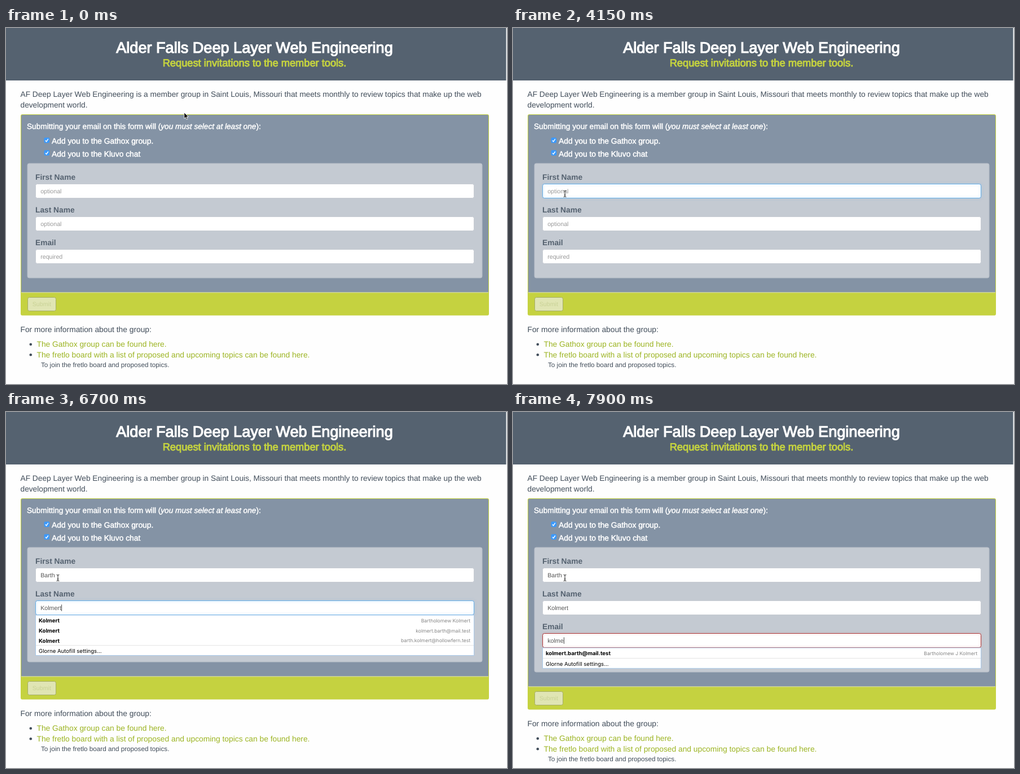
Recreate the animation shown at these times as an HTML page. Size 888 by 631 pixels, loop 8000 ms.

```html
<!DOCTYPE html>
<html lang="en">
<head>
<meta charset="utf-8">
<title>Invitation form</title>
<style>
  html, body { margin: 0; width: 100%; height: 100%; overflow: hidden; background: #fefefe; }
  svg { display: block; width: 888px; height: 631px; }
  text {
    font: 13.8px "Liberation Sans", Arial, sans-serif;
    fill: #414d5a; text-rendering: geometricPrecision; white-space: pre;
  }
  .mid { stroke: currentColor; stroke-width: .036em; }
  .white { fill: #fff; color: #fff; }
  .lime { fill: #c5d33f; color: #c5d33f; }
  .title { font-size: 27.1px; text-anchor: middle; stroke-width: .044em; }
  .sub { font-size: 18.25px; text-anchor: middle; stroke-width: .05em; }
  .intro { font-size: 13.72px; }
  .ask { font-size: 13.65px; }
  .label { font-weight: bold; font-size: 13.75px; fill: #556270; }
  .link { fill: #9cb422; }
  .note { font-size: 11.7px; }
  .value { font-size: 10.65px; fill: #555; }
  .hint { font-size: 10.65px; fill: #999; }
  .submit { font-size: 10.65px; fill: #c9d296; text-anchor: middle; }
  .pop text { font: 9.6px Inter, "Open Sans", sans-serif; fill: #000; }
  .pop .pick { font-weight: bold; font-size: 9.6px; }
  .pop .who { font-size: 8.6px; fill: #858585; text-anchor: end; }
  .ring { fill: none; stroke: #66afe9; filter: drop-shadow(0 0 2.5px rgba(102,175,233,.65)); }
  .ring.bad { stroke: #b03a3c; filter: drop-shadow(0 0 2px rgba(206,132,131,.7)); }
  .box { fill: #3b99fc; }
  .box.off { fill: #fff; stroke: #bbb; stroke-width: .6; }
  .tick { fill: none; stroke: #fff; stroke-width: 1.4; }
</style>
</head>
<body>
<svg viewBox="0 0 888 631">
  <rect width="886.5" height="93" fill="#556270"/>
  <text class="mid white title" x="440.5" y="44">Alder Falls Deep Layer Web Engineering</text>
  <text class="mid lime sub" x="440.5" y="68.3">Request invitations to the member tools.</text>
  <text class="intro" x="25.5" y="122">AF Deep Layer Web Engineering is a member group in Saint Louis, Missouri that meets monthly to review topics that make up the web</text>
  <text class="intro" x="25.5" y="141">development world.</text>

  <rect id="panel" x="26" y="153" width="830" height="356.5" rx="3" fill="#c5d240"/>
  <rect id="body" x="27" y="154" width="828" height="314.5" rx="2" fill="#8493a5"/>
  <text class="mid white ask" x="37" y="179">Submitting your email on this form will (<tspan font-style="italic">you must select at least one</tspan>):</text>
  <g id="checks"></g>
  <text class="mid white" x="81" y="205.3">Add you to the Gathox group.</text>
  <text class="mid white" x="81" y="228">Add you to the Kluvo chat</text>
  <rect id="well" x="38" y="240" width="806" height="203" rx="3" fill="#c4cad2" stroke="#b4bbc5"/>

  <g id="below">
    <rect x="27" y="468" width="828" height="3" fill="#c5d240"/>
    <rect x="27" y="465" width="828" height="3.5" fill="#8493a5"/>
    <rect x="27" y="468.4" width="828" height=".9" fill="#dde0cb"/>
    <rect x="38.5" y="477.5" width="50" height="24" rx="3" fill="#e0e5b4" stroke="#a5ad66"/>
    <text class="submit" x="63.3" y="493">Submit</text>
    <text x="25.5" y="538.7">For more information about the group:</text>
    <g fill="#414d5a"><circle cx="43.8" cy="560.7" r="2.3"/><circle cx="43.8" cy="579.3" r="2.3"/></g>
    <text class="link" x="54.5" y="565">The Gathox group can be found here.</text>
    <text class="link" x="54.5" y="583.7">The fretlo board with a list of proposed and upcoming topics can be found here.</text>
    <text class="note" x="62" y="600.5">To join the fretlo board and proposed topics.</text>
  </g>

  <g id="fields"></g>
  <g id="pops"></g>

  <g id="cursor" stroke-linejoin="round">
    <path id="arrow" d="M0 0V10.8L2.5 8.5 4.2 12.4 6 11.6 4.3 7.8H7.7Z" stroke="#fff" stroke-width=".9"/>
    <path id="hand" d="M3.2.8q1.2-.6 1.5.8l.8 3c.6-.5 1.4-.4 1.7.2.7-.5 1.4-.2 1.7.4 1-.3 1.6.5 1.5 1.6l-.2 2.6-1 2.2v1.5h-5.2l-.3-1.5-2.7-3.6c-.5-.8.6-1.5 1.3-.9l1.2 1-1-5.8q-.2-1 .7-1.5z" fill="#fff" stroke="#000" stroke-width=".9"/>
    <g id="beam" fill="none">
      <path d="M-2.3-5.6Q0-5.6 0-4V4Q0 5.6-2.3 5.6M2.3-5.6Q0-5.6 0-4M0 4Q0 5.6 2.3 5.6M-1.3 2H1.3" stroke="#fff" stroke-width="2" opacity=".6"/>
      <path d="M-2.3-5.6Q0-5.6 0-4V4Q0 5.6-2.3 5.6M2.3-5.6Q0-5.6 0-4M0 4Q0 5.6 2.3 5.6M-1.3 2H1.3" stroke="#222"/>
    </g>
  </g>
</svg>
<script>
const LOOP = 8000, STEP = 150, GROW = 18, ERROR_AT = 7300;
const $ = id => document.getElementById(id);
const show = (el, on) => { el.style.display = on ? '' : 'none'; };
const latest = (list, t) => list.filter(row => row[0] <= t).pop();

const full = 'Bartholomew Kolmert';
const mail = 'kolmert.barth@mail.test';
const workMail = 'barth.kolmert@hollowfern.test';

// keys: [time, letters typed]
const fields = [
  { label: 'First Name', hint: 'optional', word: 'Barth', y: 289, from: 3700, to: 5350,
    keys: [[0, 0], [4450, 1], [4750, 2], [4900, 4], [5050, 5]],
    picks: [['Barth', full], ['Barth', mail]] },
  { label: 'Last Name', hint: 'optional', word: 'Kolmert', y: 347, from: 5350, to: 7000,
    keys: [[0, 0], [5800, 1], [5950, 2], [6100, 4], [6250, 5], [6400, 6], [6700, 7]],
    picks: [['Kolmert', full], ['Kolmert', mail], ['Kolmert', workMail]] },
  { label: 'Email', hint: 'required', word: 'kolme', y: 405, from: 7000, to: 8000,
    keys: [[0, 0], [7300, 1], [7450, 2], [7600, 3], [7750, 4], [7900, 5]],
    picks: [[mail, 'Bartholomew J Kolmert']] }
];

const checks = [
  { y: 199, off: 1170, on: 1470 },
  { y: 221.3, off: 2060, on: 2960 }
];

const moves = [
  [0, 'arrow', 315.8, 149.8], [150, 'arrow', 306, 157], [300, 'arrow', 264, 184],
  [450, 'hand', 202, 210], [600, 'hand', 140, 223], [740, 'hand', 104, 220],
  [880, 'hand', 84, 210], [1030, 'hand', 76, 201], [1170, 'hand', 75, 199],
  [1320, 'hand', 77, 200], [1470, 'hand', 76, 199], [1620, 'hand', 84, 206],
  [1770, 'hand', 87, 213], [1910, 'hand', 81, 219], [2060, 'hand', 76, 221.5],
  [3260, 'arrow', 85, 258], [3410, 'beam', 92, 294]
];

$('checks').innerHTML = checks.map(({ y }) => `
  <rect class="box" x="67.5" y="${y - 4.8}" width="9.6" height="9.6" rx="2"/>
  <path class="tick" d="M69.8 ${y + .3}l1.8 2 3.2-4.6"/>`).join('');

$('fields').innerHTML = fields.map(({ label, hint, y }) => `<g>
  <text class="label" x="52" y="${y - 20.2}">${label}</text>
  <rect x="52.5" y="${y - 12.5}" width="777" height="25" rx="3" fill="#fff" stroke="#c6cbd2"/>
  <rect class="ring" x="52.5" y="${y - 12.5}" width="777" height="25" rx="3"/>
  <text class="hint" x="61.2" y="${y + 3.8}">${hint}</text>
  <text class="value" x="61.2" y="${y + 3.8}"></text>
  <rect class="caret" y="${y - 5.7}" width=".9" height="11.6" fill="#333"/></g>`).join('');

function popup({ y, picks }) {
  const top = y + 13, last = top + 10 + 17.6 * (picks.length - 1);
  const rows = picks.map(([pick, who], i) => {
    const base = top + 13.4 + 17.6 * i;
    return `<text class="pick" x="58" y="${base}">${pick}</text>
      <text class="who" x="823" y="${base - .4}">${who}</text>`;
  }).join('');
  return `<g class="pop">
    <rect x="52.5" y="${top}" width="777" height="${last + 26.3 - top}" fill="#fff" stroke="#a3c6ea" stroke-width=".9"/>
    ${rows}
    <rect x="53" y="${last + 8.2}" width="776" height=".8" fill="#dcdcdc"/>
    <text x="58" y="${last + 21.6}">Glorne Autofill settings...</text></g>`;
}
$('pops').innerHTML = fields.map(popup).join('');

const boxes = document.querySelectorAll('.box'), ticks = document.querySelectorAll('.tick');
const pops = $('pops').children;
const parts = [...$('fields').children].map(g => {
  const pick = name => g.querySelector('.' + name);
  return { ring: pick('ring'), hint: pick('hint'), value: pick('value'), caret: pick('caret') };
});

function glow(t, from, to) {
  if (t < from || t >= to + STEP) return 0;
  return t < from + STEP || t >= to ? .5 : 1;
}

function draw(t) {
  checks.forEach((c, i) => {
    const off = t >= c.off && t < c.on;
    boxes[i].classList.toggle('off', off);
    show(ticks[i], !off);
  });

  fields.forEach((f, i) => {
    const p = parts[i], typed = f.word.slice(0, latest(f.keys, t)[1]);
    const active = t >= f.from && t < f.to;
    const blink = i === 0 && t >= 4150 && t < 4450;
    if (p.value.textContent !== typed) p.value.textContent = typed;
    show(p.hint, !typed);
    show(p.caret, active && !blink);
    p.caret.setAttribute('x', 61.5 + (typed ? p.value.getComputedTextLength() : 0));
    p.ring.style.opacity = glow(t, f.from, f.to);
    p.ring.classList.toggle('bad', i === 2 && t >= ERROR_AT);
    show(pops[i], active && typed);
  });

  const grow = t >= ERROR_AT ? GROW : 0;
  $('panel').setAttribute('height', 356.5 + grow);
  $('body').setAttribute('height', 314.5 + grow);
  $('well').setAttribute('height', 203 + grow);
  $('below').setAttribute('transform', `translate(0 ${grow})`);

  const [, kind, x, y] = latest(moves, t);
  ['arrow', 'hand', 'beam'].forEach(id => show($(id), id === kind));
  $('cursor').setAttribute('transform', `translate(${x} ${y})`);
}

const start = performance.now();
function tick() {
  draw((performance.now() - start) % LOOP);
  requestAnimationFrame(tick);
}
tick();
</script>
</body>
</html>
```
